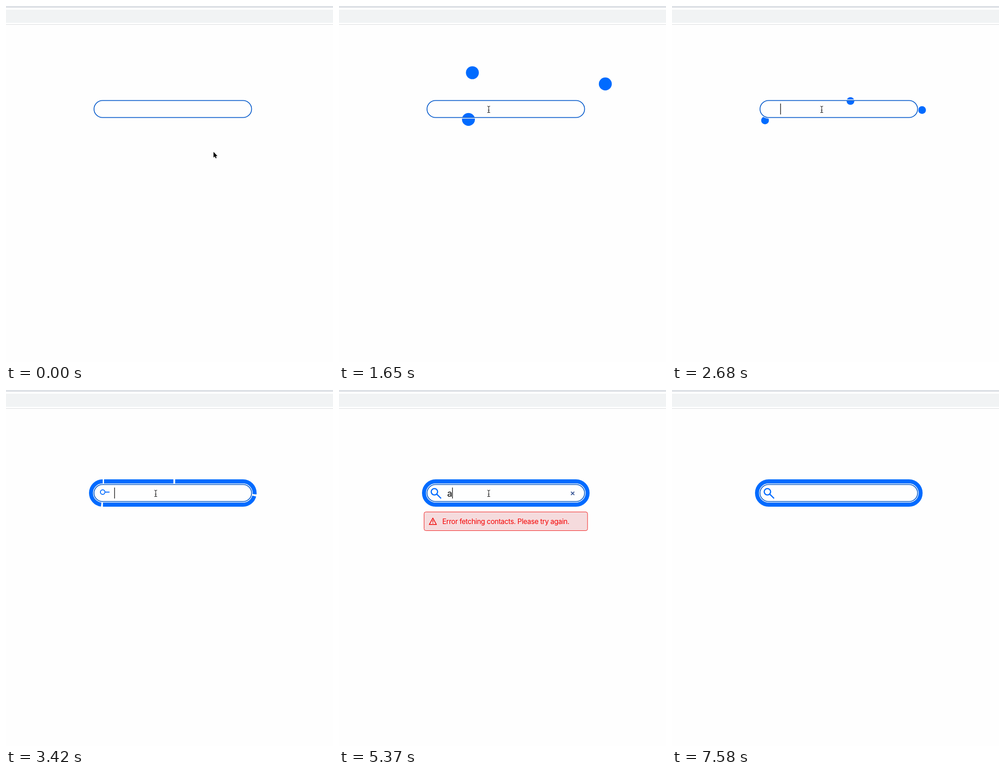
Write an HTML page that moves like this. It is 717x781 px and loops after 8000 ms.

```html
<!DOCTYPE html>
<html lang="en">
<head>
<meta charset="utf-8">
<title>Contact search</title>
<style>
  html, body { margin: 0; width: 100%; height: 100%; overflow: hidden; background: #fefefe; }
  svg { display: block; width: 717px; height: 781px; }
  text { font-family: Inter, "Open Sans", sans-serif; }
  .blue { fill: #006bff; }
  .line { fill: none; stroke: #006bff; }
  .red { fill: none; stroke: #f01414; }
</style>
</head>
<body>
<svg viewBox="0 0 717 781">
  <rect width="717" height="4" fill="#dee1e6"/>
  <rect y="4" width="717" height="36" fill="#fff"/>
  <rect y="8" width="717" height="29" fill="#f1f3f4"/>
  <rect y="40" width="717" height="1" fill="#d9dbdd"/>

  <g id="balls" class="blue"><circle/><circle/><circle/></g>
  <path id="ring" class="line" stroke-width="9"
    d="M212 200.5H519.5A25.5 25.5 0 0 1 519.5 251.5H212A25.5 25.5 0 0 1 212 200.5Z"/>
  <rect x="191.7" y="206" width="348" height="40" rx="20" fill="none" stroke="#fefefe" stroke-width="2"/>
  <rect x="193" y="207.3" width="345.5" height="37.4" rx="18.7" fill="none" stroke="#0a5dcc" stroke-width="1.8"/>

  <g id="icon" class="line"><circle/><path/></g>
  <text id="query" x="237.3" y="234" font-size="19.5"></text>
  <path id="clear" d="M508.7 223.2l7.2 7.2m0-7.2l-7.2 7.2" fill="none" stroke="#3a5796" stroke-width="2"/>
  <rect id="caret" y="214" width="1.3" height="24"/>

  <g id="error">
    <rect x="186.5" y="267.5" width="358.5" height="41" rx="4" class="red" style="fill:#f5dbdd"/>
    <path class="red" stroke-width="1.7" stroke-linejoin="round" d="M205.8 281L213.6 295.2H198Z"/>
    <path class="red" stroke-width="1.7" d="M205.8 285.5v4.6m0 1.2v1.8"/>
    <text x="226.5" y="294" font-size="15.25" letter-spacing="-.35" fill="#f50000">Error fetching contacts. Please try again.</text>
  </g>

  <path id="arrow" d="M0 0V12.6L2.9 9.9L4.8 14.2L6.8 13.3L4.9 9.2H8.7Z" stroke="#fff" stroke-width="1" paint-order="stroke"/>
  <path id="beam" fill="none" stroke="#111" stroke-width="1.1"
    d="M-3-7Q0-7 0-5V5Q0 7-3 7M3-7Q0-7 0-5M0 5Q0 7 3 7M-1.7 1.8H1.7"/>
</svg>
<script>
const LOOP = 8000, STEP = 148.9, BLINK = 526;
const CLICK = 2360, TYPED = 3870, ERASE = 5370, EMPTY = 5520, LEAVE = 6240;
const $ = id => document.getElementById(id);
const set = (el, attrs) => { for (const k in attrs) el.setAttribute(k, attrs[k]); };
const show = (el, on) => { el.style.display = on ? '' : 'none'; };
const clamp = v => Math.max(0, Math.min(1, v));
const mix = (a, b, p) => a + (b - a) * p;
const ease = p => p * p * (3 - 2 * p);

// The ring splits where the balls land, and at its own start
const ring = $('ring'), total = ring.getTotalLength();
const splits = [1, 157, 352, 696];
const homes = splits.slice(1).map(d => ring.getPointAtLength(d)).map(p => [p.x, p.y]);

// Each ball leaves from the opposite landing place and swings through three poses
const times = [2, 7, 14, 18, 20];
const swings = [
  [[189, 173], [373, 145], [391.3, 208.4]],
  [[555, 160], [596.5, 192], [548.3, 228.3]],
  [[379.3, 237.3], [212, 253], [204, 251]]
].map((poses, i) => [homes[2 - i], ...poses, homes[i]]);

// Cubic Hermite through the poses, with slopes taken from the neighbours
function along(poses, s, axis) {
  const last = times.length - 1;
  let i = 0;
  while (i < last - 1 && s >= times[i + 1]) i++;
  const h = times[i + 1] - times[i], p = clamp((s - times[i]) / h), q = 1 - p;
  const slope = k => {
    const l = Math.max(0, k - 1), r = Math.min(last, k + 1);
    return (poses[r][axis] - poses[l][axis]) / (times[r] - times[l]) * h;
  };
  return q * q * ((1 + 2 * p) * poses[i][axis] + p * slope(i)) +
         p * p * ((3 - 2 * p) * poses[i + 1][axis] - q * slope(i + 1));
}

function drawBalls(s) {
  show($('balls'), s >= 3 && s <= 20);
  const r = 14.8 * clamp((s - 1) / 3) - 9.3 * clamp((s - 7) / 13) ** 2.3;
  [...$('balls').children].forEach((el, i) =>
    set(el, { cx: along(swings[i], s, 0), cy: along(swings[i], s, 1), r }));
}

// Every part grows from its split towards the next one
function drawRing(s) {
  show(ring, s > 20);
  const grow = clamp((s - 20) / 3);
  const dash = splits.flatMap((a, i) => {
    const span = (splits[i + 1] || total + 1) - a, len = (span - 4) * grow;
    return [len, span - len];
  });
  set(ring, { 'stroke-dasharray': s > 23 ? 'none' : dash.join(' '), 'stroke-dashoffset': -3 });
}

function drawIcon(s) {
  show($('icon'), s > 20);
  const k = clamp((s - 20) / 3), p = clamp((s - 23) / 3), r = mix(5, 7, p);
  const [lens, handle] = $('icon').children;
  set($('icon'), {
    transform: `translate(${mix(212, 209.2, p)} ${mix(224, 223.3, p)}) rotate(${45 * p}) scale(${k})`,
    'stroke-width': mix(2, 2.6, p)
  });
  set(lens, { r });
  set(handle, { d: `M${r} 0H${mix(15, 20.6, p)}` });
}

function drawPointer(s, t) {
  const come = ease(clamp(s / 4)), go = clamp(Math.ceil((t - LEAVE + 1) / 140) / 2);
  const x = mix(mix(455, 328.3, come), 16, go), y = mix(mix(320, 226.7, come), 80, go);
  const inside = y > 207 && y < 245;
  show($('beam'), inside);
  show($('arrow'), !inside && t < LEAVE + 290);
  for (const id of ['beam', 'arrow']) set($(id), { transform: `translate(${x} ${y})` });
}

function drawText(s, t) {
  const n = t >= EMPTY ? 0 : t >= ERASE ? 1 : Math.max(0, Math.min(2, s - 24));
  const since = t - (t < TYPED ? CLICK : TYPED);
  $('query').textContent = 'a'.repeat(n);
  show($('clear'), n);
  show($('error'), s >= 27 && t < EMPTY);
  show($('caret'), since >= 0 && Math.floor(since / BLINK) % 2 === 0);
  set($('caret'), { x: 237.4 + 10.7 * n });
}

function frame(now) {
  const t = now % LOOP, s = Math.floor((t + 8) / STEP);
  drawBalls(s);
  drawRing(s);
  drawIcon(s);
  drawText(s, t);
  drawPointer(s, t);
  requestAnimationFrame(() => frame(performance.now() - start));
}
const start = performance.now();
frame(0);
</script>
</body>
</html>
```
